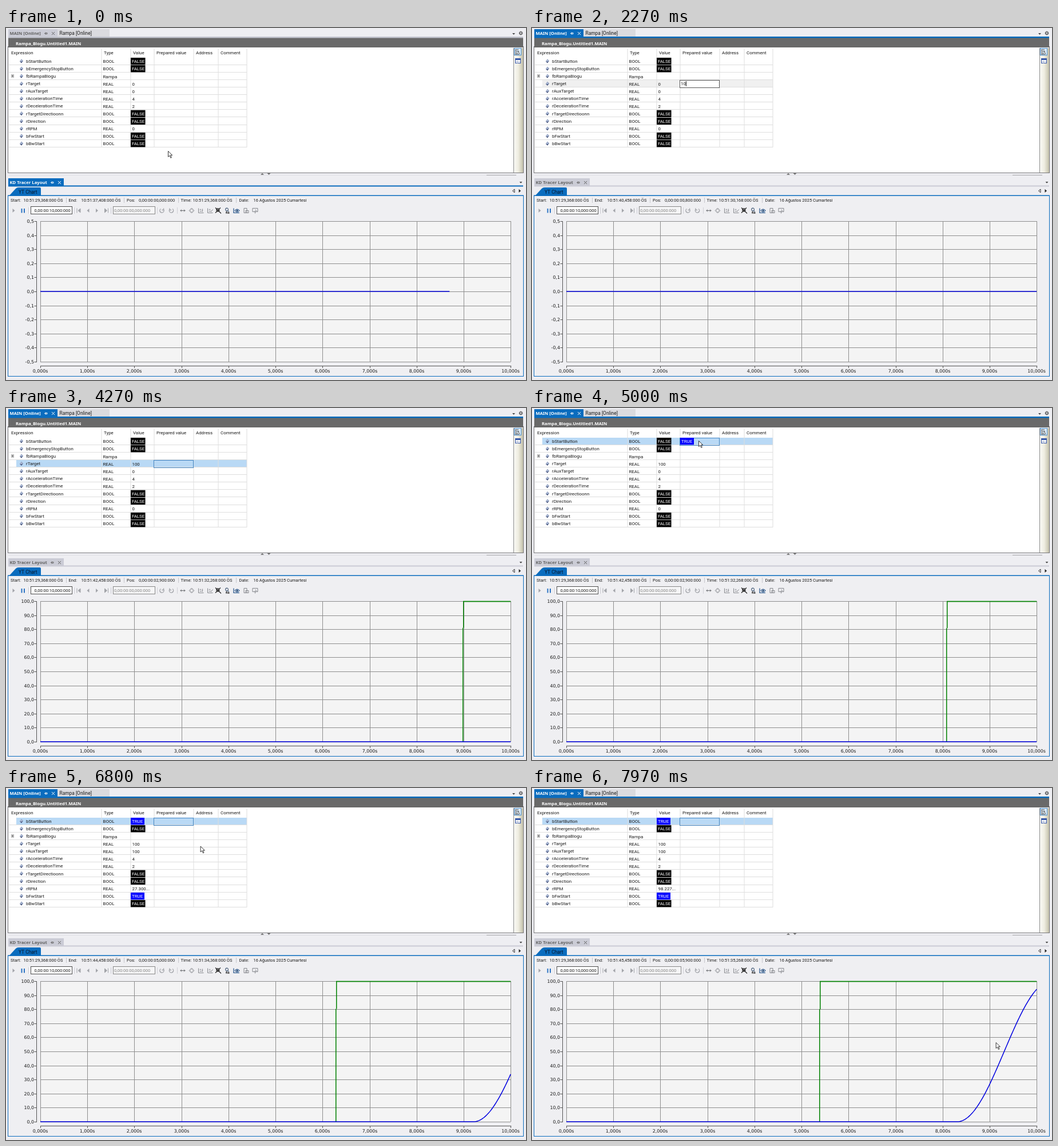
Write an HTML page with a canvas that moves like this. It is 909 px wide and 616 px high and loops after 8000 ms.

```html
<!DOCTYPE html>
<html lang="en">
<head>
<meta charset="utf-8">
<title>Ramp chart</title>
<style>
html, body { margin: 0; width: 100%; height: 100%; overflow: hidden; background: #eeeef2; }
canvas { display: block; }
</style>
</head>
<body>
<canvas id="stage" width="909" height="616"></canvas>
<script>
const ctx = document.getElementById('stage').getContext('2d');
const LOOP = 8000, BLUE = '#0a6cbe', INK = '#1a1a1a';
const UI = '7.9px Roboto, sans-serif', SMALL = '7.5px Roboto, sans-serif';
const TAB = '8.4px Roboto, sans-serif', BOLD = 'bold 7.7px "Noto Sans", sans-serif';
const AXIS = '7.9px "DejaVu Sans", sans-serif';
const PLOT = { x: 60, y: 338, w: 822.2, h: 246 };
const SECOND = PLOT.w / 10;
const COLUMNS = [5, 167, 218, 259, 328, 371, 421];
const ROW0 = 51.6, ROW = 13.1;
const TARGET_AT = 11.88, RAMP_AT = 14.81;

// time, x, y of the pointer
const POINTER = [
  [0, 283, 215], [30, 283, 215], [570, 282, 104], [830, 282, 104], [900, 294, 100],
  [3070, 294, 100], [3370, 412, 25], [3550, 450, -20], [4430, 420, -20], [4700, 318, 42],
  [4870, 291, 57], [6700, 291, 57], [6800, 339, 101], [7300, 640, 330], [8000, 818, 450]
];

function rect(x, y, w, h, color) {
  ctx.fillStyle = color;
  ctx.fillRect(x, y, w, h);
}
function frame(x, y, w, h, color, fill) {
  if (fill) rect(x, y, w, h, fill);
  ctx.strokeStyle = color;
  ctx.lineWidth = 1;
  ctx.strokeRect(x + .5, y + .5, w - 1, h - 1);
}
function text(s, x, y, color = INK, font = UI, align = 'left') {
  ctx.font = font;
  ctx.fillStyle = color;
  ctx.textAlign = align;
  ctx.fillText(s, x, y);
}
function shape(d, x, y, { fill, stroke, width = 1 }) {
  const path = new Path2D(d);
  ctx.save();
  ctx.translate(x, y);
  if (fill) { ctx.fillStyle = fill; ctx.fill(path); }
  if (stroke) { ctx.strokeStyle = stroke; ctx.lineWidth = width; ctx.stroke(path); }
  ctx.restore();
}

function tab(label, y, w, active) {
  rect(4, y, w, 14, active ? BLUE : '#cbccd6');
  const color = active ? '#fff' : '#626262';
  text(label, 6.5, y + 10, color, BOLD);
  shape('M-3 0H-1M-1 -2V2M-1 -1H2V1H-1', w - 16, y + 7.5, { stroke: color, width: .9 });
  shape('M-2.5 -2.5L2.5 2.5M2.5 -2.5L-2.5 2.5', w - 3.5, y + 7.5, { stroke: color });
}

function drawWindows(mainActive) {
  rect(0, 0, 909, 616, '#eeeef2');
  rect(90, 2, 91, 13, '#dbdbdf');
  text('Rampa [Online]', 93.5, 12, INK, TAB);
  tab('MAIN [Online]', 2, 86, mainActive);
  frame(3, 32, 902, 222, '#77777b', '#fff');
  rect(4, 15, 900, 3, mainActive ? BLUE : '#c4c6d0');
  rect(4, 17.5, 900, 16.5, '#696969');
  text('Rampa_Blogu.Untitled1.MAIN', 17, 29.5, '#fff', BOLD);
  shape('M-2.5 -1H2.5L0 1.8Z', 887.5, 10, { fill: '#444' });
  shape('M2 0A2 2 0 1 1 -2 0A2 2 0 1 1 2 0M0 -3.5V-2M0 2V3.5M-3.5 0H-2M2 0H3.5M-2.4 -2.4L-1.4 -1.4M1.4 1.4L2.4 2.4M2.4 -2.4L1.4 -1.4M-1.4 1.4L-2.4 2.4', 900, 9, { stroke: '#444', width: 1.2 });

  const strip = ctx.createLinearGradient(887, 0, 904, 0);
  strip.addColorStop(0, '#fafaf7');
  strip.addColorStop(.5, '#efede1');
  strip.addColorStop(1, '#c3c0aa');
  rect(887, 35, 17, 218, strip);
  rect(887, 35, 1, 218, '#8c8c8c');
  frame(888, 35, 13, 13, '#4d8fcb', '#dcebf8');
  shape('M-4 -4H2M-2 -1H3M-2 2H1M-4 4H3M-3 -4V4M1 -2L4 4', 894, 42, { stroke: '#555' });
  frame(890, 53, 10, 9, '#3557a8', '#fff');
  rect(890, 53, 10, 3, '#3557a8');
  shape('M-4 1H4M-1 -1V4', 895, 58, { stroke: '#aab6d4' });

  shape('M-3 1.5H3L0 -1.5Z', 448, 255.5, { fill: '#777' });
  shape('M-3 -1.5H3L0 1.5Z', 459.5, 255.5, { fill: '#777' });
  rect(840, 257, 52, 1, '#a2a2a6');
  rect(4, 257, 836, 1, '#dcdce2');

  tab('KD Tracer Layout', 263, 97, !mainActive);
  rect(4, 275.5, 900, 2, mainActive ? '#cbccd6' : BLUE);
  shape('M-2.5 -1H2.5L0 1.8Z', 900, 270, { fill: '#444' });
  frame(3, 293, 902, 317, BLUE, '#efeff2');
  rect(3, 292.5, 902, 1.5, BLUE);
  shape('M0 0L11 -12Q13 -14 16 -14H53Q55 -14 55 -12V0Z', 6, 293, { fill: BLUE });
  text('YT Chart', 22, 289.5, '#06152a', TAB);
  shape('M2 -3L-1.5 0L2 3Z', 887, 285, { stroke: '#333' });
  shape('M-2 -3L1.5 0L-2 3Z', 898.5, 285, { fill: '#222' });
}

function drawToolbar() {
  const gray = '#a3a5aa', mid = '#85878c', y = 319.5;
  const left = 'M2 -3.5L-2 0L2 3.5Z', right = 'M-2 -3.5L2 0L-2 3.5Z';
  const axes = 'M-4 -4V4H5M-2 1H2M-2 -2H1', turn = 'M-2 -3A3.6 3.6 0 1 0 3 -2M3 -4V-1H0';
  shape(right, 13.5, y, { fill: gray });
  rect(26.5, 316, 2, 7.5, '#2d74c4');
  rect(31, 316, 2, 7.5, '#2d74c4');
  [39, 119, 183, 264, 299].forEach(x => rect(x, 314, 1, 11, '#cfcfd6'));
  frame(43, 312, 73, 14, '#4d4d4d', '#fff');
  text('0,00:00:10,000:000', 49.5, 321.8, INK, SMALL);
  frame(187, 312, 74, 14, '#888', '#f5f5f6');
  text('0,00:00:00,000:000', 189, 321.8, '#858585', SMALL);
  shape(left + 'M-4 -4V4', 128, y, { fill: gray, stroke: gray });
  shape(left, 143.5, y, { fill: gray });
  shape(right, 159, y, { fill: gray });
  shape(right + 'M4 -4V4', 174.5, y, { fill: gray, stroke: gray });
  shape(turn, 272.5, y, { stroke: gray, width: 1.4 });
  ctx.save();
  ctx.translate(578, 0);
  ctx.scale(-1, 1);
  shape(turn, 289, y, { stroke: gray, width: 1.4 });
  ctx.restore();
  shape('M-4 0H4M-2 -2L-4 0L-2 2M2 -2L4 0L2 2', 309, y, { stroke: '#66686d' });
  shape('M0 -4.5L2 -2.5H-2ZM0 4.5L2 2.5H-2ZM-4.5 0L-2.5 -2V2ZM4.5 0L2.5 -2V2Z', 324.5, y, { stroke: mid, width: .8 });
  shape(axes + 'M3 -3V2', 340.5, y, { stroke: mid });
  shape(axes + 'M2 2L5 -2', 356.5, y, { stroke: mid });
  shape('M2 -1A2.6 2.6 0 1 1 -3.2 -1A2.6 2.6 0 1 1 2 -1M1 1L5 5M-5 -5L4 4M4 -5L-5 4', 371, y, { stroke: '#222', width: 1.2 });
  shape('M2 -2A2.4 2.4 0 1 1 -2.8 -2A2.4 2.4 0 1 1 2 -2M1 0L3 2', 386.5, y, { stroke: '#455c78', width: 1.1 });
  text('fix', 384, 325, '#111', 'bold 6px Roboto, sans-serif');
  shape('M-5 -4V4H5M-3 0Q1 -5 5 0Q1 5 -3 0', 403, y, { stroke: '#1b4c85', width: 1.2 });
  shape('M2.5 0A1.5 1.5 0 1 1 -.5 0A1.5 1.5 0 1 1 2.5 0', 403, y, { fill: '#143b68' });
  shape('M-3 -4H2V4H-3ZM0 0H5V4H0Z', 419, y, { stroke: mid });
  shape('M-4.5 -4H4.5V2H-4.5ZM0 -2L3 1M0 5V0', 435.5, y, { stroke: mid });
}

function drawStatus(time, samples) {
  const tick = Math.floor((time + 730) / 1000);
  const pos = tick ? Math.max(0, samples(tick * 1000 - 730) - 10) : 0;
  const number = v => v.toFixed(3).replace('.', ',');
  const end = `10:51:${37 + tick},${tick > 2 ? 458 : 408}:000 ÖS`;
  [['Start:', 8], ['10:51:29,368:000 ÖS', 30.5], ['End:', 109.5], [end, 131.5],
   ['Pos:', 211], [`0,00:00:0${number(pos)}:000`, 232], ['Time:', 305.5],
   [`10:51:${number(29.368 + pos)}:000 ÖS`, 326.5], ['Date:', 407.5], ['16 Ağustos 2025 Cumartesi', 432.5]
  ].forEach(([s, x]) => text(s, x, 304.3, INK, SMALL));
  [105, 206, 301, 402].forEach(x => rect(x, 297, 1, 9, '#c6c6cc'));
}

function flag(on, x, y) {
  rect(x, y + .4, on ? 24 : 25.5, ROW - .8, on ? '#00f' : '#000');
  text(on ? 'TRUE' : 'FALSE', x + 2, y + 9.3, '#fff');
}

function drawTable(time) {
  const started = time >= 6100, written = time >= 3120;
  const selected = time < 1130 ? -1 : time < 4770 ? 3 : 0;
  const editing = time >= 1330 && time < 2400;
  const refresh = Math.floor((time - 100) / 200) * 200 + 100;
  const phase = Math.min(1, .35 + .565 * (refresh - 6700) / 1200);
  const rpm = 50 * (1 - Math.cos(Math.PI * phase));
  const rpmText = (Math.floor(rpm * 1000) / 1000).toFixed(3) + '...';
  const rows = [
    ['bStartButton', started], ['bEmergencyStopButton', false], ['fbRampaBlogu', ''],
    ['rTarget', written ? '100' : '0'], ['rAuxTarget', started ? '100' : '0'],
    ['rAccelerationTime', '4'], ['rDecelerationTime', '2'],
    ['rTargetDirectioonn', false], ['rDirection', false],
    ['rRPM', started ? rpmText : '0'], ['bFwStart', started], ['bBwStart', false]
  ];

  if (time >= 3240 && time < 3420) rect(329, 36, 42, 15, '#d9ecf2');
  ['Expression', 'Type', 'Value', 'Prepared value', 'Address', 'Comment']
    .forEach((s, i) => text(s, COLUMNS[i] + 4, 46));
  const cellY = Math.round(ROW0 + selected * ROW);
  if (selected >= 0) rect(18, cellY, 403, 13, editing ? '#f0f0f0' : '#b9d9f5');
  COLUMNS.slice(1).forEach(x => rect(x - .5, 36, 1, 173, '#dedede'));

  rows.forEach(([name, value], i) => {
    const y = ROW0 + i * ROW, base = y + 9.2;
    const type = typeof value === 'boolean' ? 'BOOL' : value ? 'REAL' : 'Rampa';
    rect(5, Math.round(y + ROW) - 1, 416, 1, '#dedede');
    shape('M0 -3.5L3 -.5L0 3.5L-3 .5Z', 27, y + 6.5, { fill: '#46557e' });
    shape('M0 -3.5L3 -.5L0 1L-3 .5Z', 27, y + 6.5, { fill: '#a9b7d3' });
    text(name, 35, base);
    text(type, 169.5, base + .5);
    if (type === 'BOOL') flag(value, 218, y);
    else text(value, 220.5, base + .4);
  });
  frame(9, 81, 5, 6, '#b4b4b4', '#fff');
  shape('M-1.5 0H1.5M0 -1.5V1.5', 11.5, 84, { stroke: '#333', width: .9 });

  if (selected < 0) return;
  frame(258, cellY, 70, 14, editing ? '#555' : '#3f85c6', editing ? '#fff' : null);
  if (selected === 3) {
    const typed = time < 1970 ? '' : time < 2070 ? '1' : time < 2310 ? '10' : '100';
    if (!written) text(typed, 260, cellY + 9);
    if (editing) rect(260 + typed.length * 4.4, cellY + 2, 1, 9, '#000');
  } else if (time >= 4900 && !started) {
    flag(true, 259, ROW0);
  }
}

function drawChart(end, hasTarget) {
  const { x: left, y: top, w, h } = PLOT;
  const start = Math.max(0, end - 10);
  const toX = s => left + (s - start) * SECOND;
  rect(left, top, w, h, '#f4f4f4');
  rect(53, top, 1, h + 1, '#555');
  rect(left, 591, w + 1, 1, '#555');
  for (let i = 0; i <= 10; i++) {
    const x = Math.round(left + i * SECOND), y = Math.round(top + i * h / 10);
    rect(x, top, 1, h, '#8e8e8e');
    rect(left, y, w, 1, '#8e8e8e');
    rect(49.5, y, 4, 1, '#555');
    rect(x, 591, 1, 4, '#555');
    const level = hasTarget ? 100 - i * 10 : (5 - i) / 10;
    text(level.toFixed(1).replace('.', ','), 49, y + 3, INK, AXIS, 'right');
    text(`${i},000s`, x, 602.5, INK, AXIS, 'center');
  }

  const right = toX(end);
  if (!hasTarget) {
    rect(left, 460.25, right - left, 1.5, '#0000d8');
    return;
  }
  // the rise lasts one sample, so it crosses a pixel column part of the way up
  const edge = toX(TARGET_AT), column = Math.floor(edge);
  const split = top + h * Math.min(1, Math.max(0, 1 - (column + 1 - edge) / .82));
  rect(column, split, 1.5, top + h - split, '#008000');
  rect(column + 1, top, 1.5, split - top, '#008000');
  rect(column + 1, top - .3, right - column - 1, 1.7, '#008000');

  ctx.beginPath();
  ctx.moveTo(left, top + h);
  for (let s = RAMP_AT; s < end; s += .02) rampPoint(s);
  rampPoint(end);
  ctx.strokeStyle = '#0000e0';
  ctx.lineWidth = 1.5;
  ctx.stroke();

  function rampPoint(s) {
    const u = Math.min(1, Math.max(0, (s - RAMP_AT) / 2));
    ctx.lineTo(toX(s), top + h - h * (1 - Math.cos(Math.PI * u)) / 2);
  }
}

function drawPointer(time) {
  if (time >= 1970 && time < 3070) return;
  const next = POINTER.findIndex(p => p[0] > time);
  const [t0, x0, y0] = POINTER[next - 1], [t1, x1, y1] = POINTER[next];
  const k = (time - t0) / (t1 - t0);
  shape('M.5 .5V10.5L3 8.3L4.8 12.4L6.4 11.7L4.6 7.7H7.8Z',
    x0 + (x1 - x0) * k, y0 + (y1 - y0) * k, { fill: '#fff', stroke: '#222', width: .9 });
}

function draw(now) {
  const time = now % LOOP;
  // seconds recorded so far, shown in steps of 0.3 s
  const samples = t => 8.7 + .3 * (Math.floor((t - 200) / 300) + 1);
  const end = samples(time);
  drawWindows(time >= 1130);
  drawTable(time);
  drawStatus(time, samples);
  drawToolbar();
  drawChart(end, end > TARGET_AT);
  drawPointer(time);
  requestAnimationFrame(draw);
}
requestAnimationFrame(draw);
</script>
</body>
</html>
```
